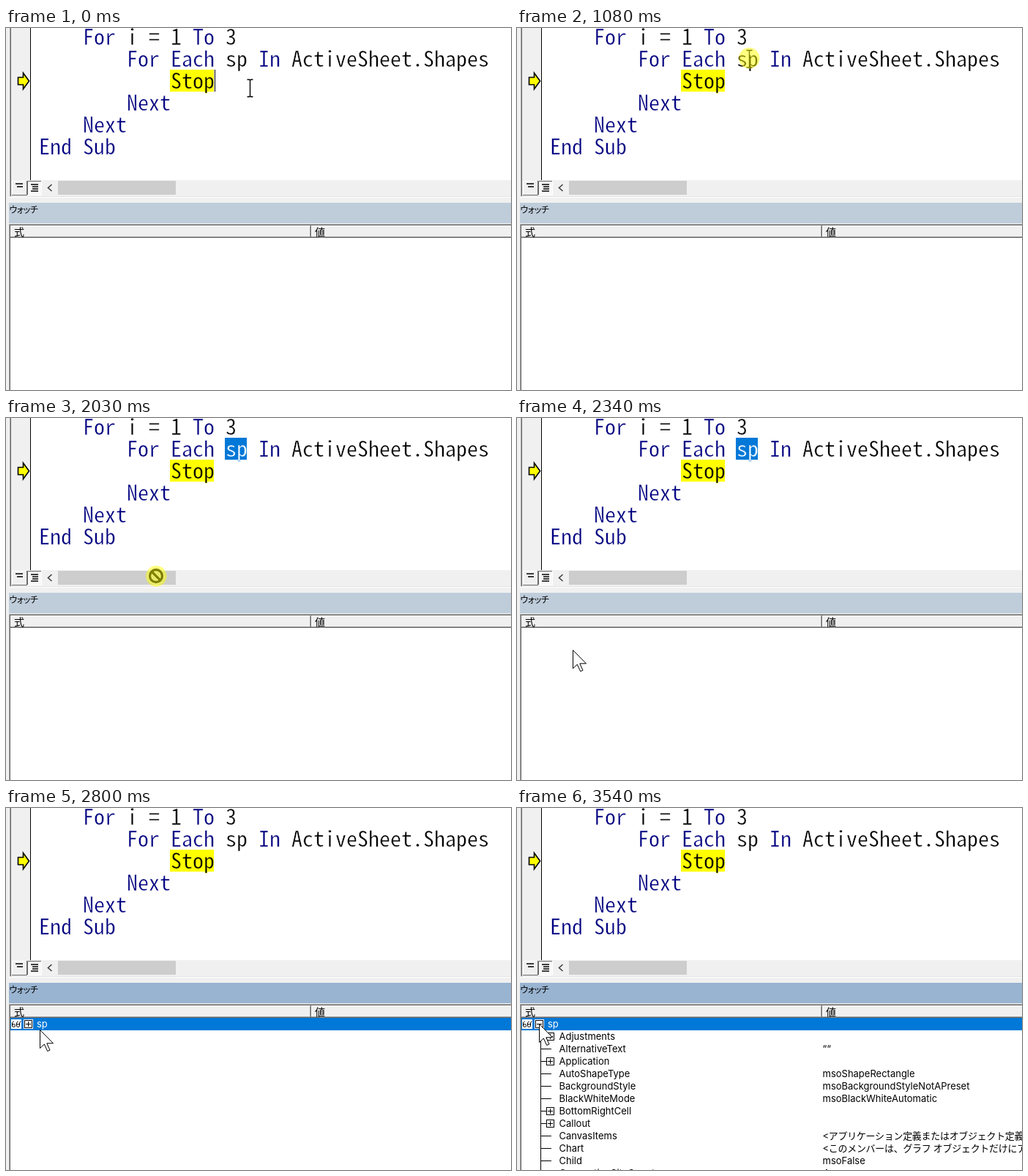
Recreate the animation shown at these times as an HTML page. Size 690 by 495 pixels, loop 4.63 s.

```html
<!DOCTYPE html>
<html lang="ja">
<head>
<meta charset="utf-8">
<title>Watch window</title>
<style>
html, body { margin: 0; width: 100%; height: 100%; overflow: hidden; background: #fff; }
svg { display: block; width: 690px; height: 495px; }
text { white-space: pre; }
/* a thin edge in the paper colour makes the strokes lighter */
#code { font: 30px "Noto Sans Mono CJK JP", "Noto Sans CJK JP", "Noto Sans Mono", monospace; stroke-width: .5px; }
.ui { font: 13px Inter, "Noto Sans CJK JP", "Noto Sans CJK", "Noto Sans", sans-serif; }
.ja { letter-spacing: -.3px; }
.line { fill: none; stroke: #000; }
</style>
</head>
<body>
<svg viewBox="0 0 690 495">
  <!-- code pane -->
  <rect width="690" height="495" fill="#f0f0f0"/>
  <rect x="34" width="656" height="208" fill="#fff"/>
  <rect x="33" width="1" height="208"/>
  <rect x="5" width="1" height="231" fill="#a0a0a0"/>
  <rect x="6" width="1" height="230" fill="#696969"/>
  <rect x="224" y="57" width="60" height="30" fill="#ff0"/>
  <rect id="pick" x="299" y="27" width="30" height="30" fill="#0078d7"/>
  <g id="code"></g>
  <rect id="caret" x="285" y="57" width="1" height="30"/>
  <path d="M16.5 67.5H23.5V61.5L31.5 72.5L23.5 83.5V77.5H16.5Z" fill="#ff0" stroke="#000" stroke-width="1.6"/>

  <!-- view buttons and scroll bar -->
  <path d="M8.5 228V209.5H27" class="line" style="stroke:#fff"/>
  <path d="M8 228.5H28.5V209" class="line" style="stroke:#696969"/>
  <rect x="29" y="209" width="20" height="20" fill="#f8f8f8"/>
  <path d="M29.5 228V209.5H48" class="line" style="stroke:#696969"/>
  <path d="M29 228.5H48.5V209" class="line" style="stroke:#fff"/>
  <path d="M13 213H23M15 217H23M34 214H44M36 217H44M36 220H44M34 223H44" class="line" stroke-width="1.5"/>
  <path d="M62.5 214L57.5 218.5L62.5 223" class="line" style="stroke:#404040" stroke-width="1.6"/>
  <rect x="71" y="209" width="161" height="19" fill="#cdcdcd"/>
  <rect x="5" y="230" width="685" height="1" fill="#e3e3e3"/>
  <rect x="4" y="231" width="686" height="1" fill="#fff"/>

  <!-- watch pane -->
  <rect x="4" y="239" width="686" height="28" fill="#bfcddb"/>
  <rect id="active" x="4" y="239" width="686" height="28" fill="#99b4d1"/>
  <text x="4.5" y="253" class="ui" style="font-size:12px;letter-spacing:-.4px;font-feature-settings:'palt'">ウォッチ</text>
  <rect x="4" y="268" width="686" height="227" fill="#a0a0a0"/>
  <rect x="5" y="269" width="685" height="226" fill="#696969"/>
  <rect x="6" y="270" width="684" height="16" fill="#f0f0f0"/>
  <path d="M6 270.5H690M417.5 270V286" class="line" style="stroke:#fff"/>
  <path d="M6 285.5H690M415.5 271V286" class="line" style="stroke:#a0a0a0"/>
  <path d="M416.5 270V286" class="line" style="stroke:#696969"/>
  <text x="11" y="284" class="ui" style="font-size:14px">式</text>
  <text x="422" y="284" class="ui" style="font-size:14px">値</text>
  <rect x="6" y="287" width="684" height="208" fill="#fff"/>
  <g id="watch">
    <g id="chosen">
      <rect x="6" y="287" width="684" height="17" fill="#0078d7"/>
      <rect x="7" y="289" width="14" height="13" fill="#fff"/>
    </g>
    <rect x="24" y="289" width="13" height="13" fill="#fff"/>
    <g class="line">
      <circle cx="10.5" cy="297.5" r="2"/>
      <circle cx="16.5" cy="297.5" r="2"/>
      <path d="M8.5 297.5V294L10.5 291.5M14.5 297.5V294L16.5 291.5M18.5 297V294L20 291.5"/>
      <rect x="25.5" y="290.5" width="10" height="10"/>
      <path d="M27 295.5H34"/>
      <path id="plus" d="M30.5 292V299"/>
    </g>
    <text id="spDark" x="42" y="300" class="ui">sp</text>
    <text id="spLight" x="42" y="300" class="ui" fill="#fff">sp</text>
  </g>
  <g id="tree"><path d="M32.5 304V495" class="line"/></g>

  <!-- pointer -->
  <g id="pointer">
    <path id="beam" d="M-4.5 -11.5H-1.5L-.5 -10.5L.5 -11.5H3.5M-.5 -10.5V11M-4.5 12H-1.5L-.5 11L.5 12H3.5" class="line" stroke-width="1.4"/>
    <g id="arrow"><path d="M.5 .5V25.5L6.3 20L10.7 29.5L14 28L9.8 18.8H18.5Z" fill="#fff" stroke="#000"/></g>
    <g id="drag">
      <path d="M.5 .5V25.5L6.3 20L10.7 29.5L14 28L9.8 18.8H18.5Z" fill="#fff" stroke="#000"/>
      <rect x="-21.5" y="22.5" width="20" height="9" class="line" stroke-dasharray="2 2"/>
    </g>
    <g id="ban" fill="none">
      <circle cx="-1" cy="-1" r="8.5" stroke="#fff" stroke-width="5"/>
      <path d="M-7 -7L5 5" stroke="#fff" stroke-width="5"/>
      <circle cx="-1" cy="-1" r="8.5" stroke="#000" stroke-width="3.4"/>
      <path d="M-7 -7L5 5" stroke="#000" stroke-width="3.4"/>
    </g>
    <circle id="halo" cx="-.7" cy="-.7" r="14.2" fill="#ff0" fill-opacity=".5"/>
  </g>
</svg>
<script>
const LOOP = 4630;
const $ = id => document.getElementById(id);

function add(parent, tag, attrs, text = '') {
  const el = document.createElementNS('http://www.w3.org/2000/svg', tag);
  for (const k in attrs) el.setAttribute(k, attrs[k]);
  el.textContent = text;
  return parent.appendChild(el);
}

// Code words by indent and text; keywords are navy
const keywords = /^(For|To|Each|In|Next|End|Sub)$/;
const lines = [
  [4, 'For i = 1 To 3'],
  [8, 'For Each sp In ActiveSheet.Shapes'],
  [12, 'Stop'],
  [8, 'Next'],
  [4, 'Next'],
  [0, 'End Sub']
];
let plainWord, pickedWord;
lines.forEach(([indent, line], row) => {
  for (const m of line.matchAll(/\S+/g)) {
    const word = m[0];
    const pos = { x: 45 + (indent + m.index) * 15, y: 23 + row * 30 };
    const fill = keywords.test(word) ? '#000080' : '#000';
    const stroke = word === 'Stop' ? '#ff0' : '#fff';
    const el = add($('code'), 'text', { ...pos, fill, stroke }, word);
    if (word === 'sp') {
      plainWord = el;
      pickedWord = add($('code'), 'text', { ...pos, fill: '#fff', stroke: '#0078d7' }, word);
    }
  }
});

// Members of the watched object; "+" marks a branch
const members = [
  ['+Adjustments'],
  ['AlternativeText', '““'],
  ['+Application'],
  ['AutoShapeType', 'msoShapeRectangle'],
  ['BackgroundStyle', 'msoBackgroundStyleNotAPreset'],
  ['BlackWhiteMode', 'msoBlackWhiteAutomatic'],
  ['+BottomRightCell'],
  ['+Callout'],
  ['CanvasItems', '<アプリケーション定義またはオブジェクト定義のエラーです。>'],
  ['Chart', '<このメンバーは、グラフ オブジェクトだけにアクセスできます。>'],
  ['Child', 'msoFalse'],
  ['ConnectionSiteCount', '4']
];
members.forEach(([name, value], i) => {
  const mid = 312.5 + i * 17, y = mid + 4.5, tree = $('tree');
  const branch = name[0] === '+';
  add(tree, 'path', { d: `M32 ${mid}H47`, class: 'line' });
  if (branch) {
    add(tree, 'rect', { x: 40.5, y: mid - 5, width: 10, height: 10, fill: '#fff', stroke: '#000' });
    add(tree, 'path', { d: `M42 ${mid}h7M45.5 ${mid - 3.5}v7`, class: 'line' });
  }
  add(tree, 'text', { x: 57.5, y, class: 'ui' }, name.replace('+', ''));
  if (value) add(tree, 'text', { x: 417.5, y, class: value[0] === '<' ? 'ui ja' : 'ui' }, value);
});

// Held steps: [time, value]
function hold(el, prop, list) {
  const frames = list.map(([t, v]) => ({ offset: t / LOOP, [prop]: v, easing: 'steps(1, end)' }));
  frames.push({ offset: 1, [prop]: list[list.length - 1][1] });
  el.animate(frames, { duration: LOOP, iterations: Infinity });
}
const show = (el, from, to = LOOP) =>
  hold(el, 'opacity', [...(from ? [[0, 0]] : []), [from, 1], ...(to < LOOP ? [[to, 0]] : [])]);

show($('caret'), 0, 540);
show($('pick'), 1160, 2640);
show(pickedWord, 1160, 2640);
hold(plainWord, 'opacity', [[0, 1], [1160, 0], [2640, 1]]);
show($('active'), 2640);
show($('watch'), 2640);
show($('chosen'), 2720);
show($('spDark'), 0, 2720);
show($('spLight'), 2720);
show($('plus'), 0, 3540);
show($('tree'), 3540);

// Pointer: time, x, y, shape, pressed
const poses = [
  [0, 334, 82, 'beam', 0],
  [300, 334, 79, 'beam', 0],
  [380, 332, 71, 'beam', 0],
  [460, 329, 61, 'beam', 0],
  [540, 325, 53, 'beam', 0],
  [620, 321, 47, 'beam', 0],
  [700, 318, 43, 'beam', 0],
  [770, 318, 42, 'beam', 0],
  [850, 318, 42, 'beam', 1],
  [1000, 318, 42, 'beam', 0],
  [1080, 318, 42, 'beam', 1],
  [1240, 318, 42, 'arrow', 1],
  [1320, 318, 42, 'arrow', 0],
  [1700, 318, 42, 'arrow', 1],
  [1800, 311, 52, 'drag', 1],
  [1880, 286, 95, 'drag', 1],
  [1950, 250, 156, 'drag', 1],
  [2030, 206, 217, 'ban', 1],
  [2110, 156, 260, 'ban', 1],
  [2180, 120, 282, 'drag', 1],
  [2260, 76, 317, 'arrow', 1],
  [2340, 76, 317, 'arrow', 0],
  [2720, 64, 312, 'arrow', 0],
  [2790, 46, 303, 'arrow', 0],
  [2860, 31, 294, 'arrow', 0],
  [2930, 24, 290, 'arrow', 0],
  [3080, 25, 291, 'arrow', 0],
  [3150, 28, 294, 'arrow', 0],
  [3220, 30, 295, 'arrow', 0],
  [3460, 30, 295, 'arrow', 1],
  [3540, 30, 295, 'arrow', 0]
];
hold($('pointer'), 'transform', poses.map(([t, x, y]) => [t, `translate(${x}px, ${y}px)`]));
hold($('halo'), 'opacity', poses.map(p => [p[0], p[4]]));
for (const kind of ['beam', 'arrow', 'drag', 'ban'])
  hold($(kind), 'opacity', poses.map(p => [p[0], p[3] === kind ? 1 : 0]));
</script>
</body>
</html>
```
